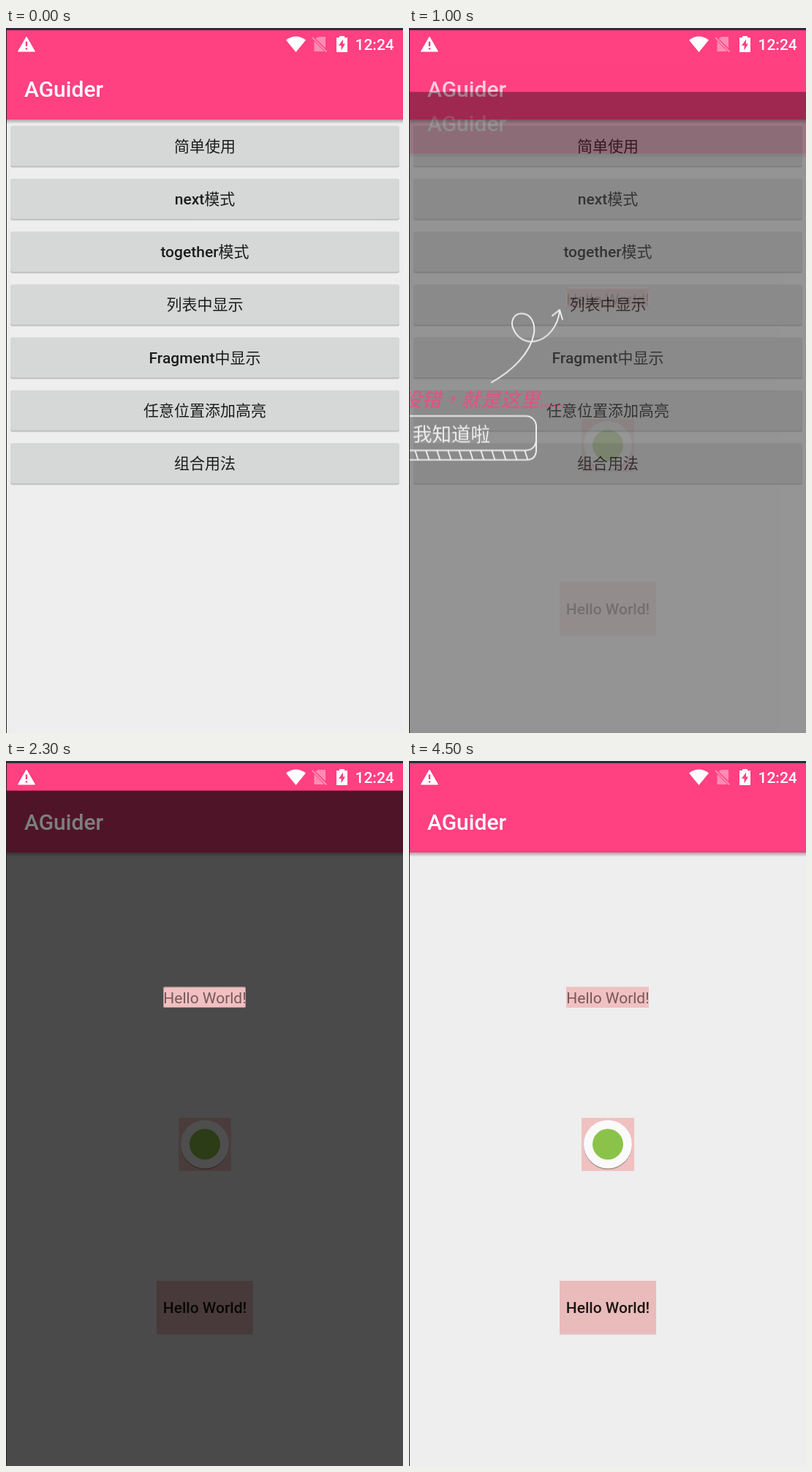
An HTML page that plays this animation: 543x963 px, repeating every 8000 ms.

```html
<!DOCTYPE html>
<html lang="zh">
<head>
<meta charset="utf-8">
<title>AGuider</title>
<style>
html, body { margin: 0; width: 100%; height: 100%; overflow: hidden; background: #eee; }
svg { display: block; width: 543px; height: 963px; }
text { font: 500 21px Roboto, "Noto Sans CJK SC", "Noto Sans CJK", sans-serif; }
.mid { text-anchor: middle; }
.title { font-size: 30px; fill: #fff; }
.plain { font-weight: 400; }
.say { font-size: 27px; font-weight: 400; font-style: italic; fill: #ff4081; }
.comma { font-family: "Noto Sans CJK TC", "Noto Sans CJK", sans-serif; }
.know { font-size: 26.5px; font-weight: 300; fill: #fff; }
.line { fill: none; stroke: #fff; stroke-width: 2; stroke-linecap: round; stroke-linejoin: round; }
.line * { vector-effect: non-scaling-stroke; }
.dim { fill: #000; fill-opacity: .69; fill-rule: evenodd; }
.edge { fill: none; stroke: #8a5c5e; stroke-opacity: .5; }

.ripple, .wave, .rise, .page, .shade, .cover, .tip1, .seam, .ghost,
.guide1, .guide2, .guide3, .tip2, .tip3 { animation: 8s step-end infinite; }

.ripple { animation-name: ripple; }
@keyframes ripple { 0%, 12.5%, to { opacity: 0 } 6.25% { opacity: 1 } }
.wave { animation-name: wave; }
@keyframes wave { 0%, to { r: 0 } 6.25% { r: 72px } 7.5% { r: 138px } }

.rise { animation-name: rise; }
@keyframes rise {
  0%, 15%, to { transform: none }
  12.5% { transform: translateY(46.5px) }
  13.75% { transform: translateY(9.5px) }
}
.page { animation-name: page; }
@keyframes page { 0% { opacity: 0 } 12.5% { opacity: .27 } 13.75% { opacity: .97 } 15%, to { opacity: 1 } }
.shade { animation-name: shade; }
@keyframes shade { 0%, 12.5% { opacity: .55 } 13.75%, to { opacity: 1 } }
.cover { animation-name: cover; }
@keyframes cover { 0%, 13.75%, to { opacity: 0 } 12.5% { opacity: 1 } }
.seam { animation-name: seam; }
@keyframes seam { 0%, 15%, to { opacity: 0 } 13.75% { opacity: .15 } }
.ghost { animation-name: ghost; }
@keyframes ghost { 0%, 56.25%, to { opacity: 0 } 13.75% { opacity: .27 } }

.guide1 { animation-name: guide1; }
@keyframes guide1 { 0%, 30%, to { opacity: 0 } 12.5% { opacity: 1 } }
.guide2 { animation-name: guide2; }
@keyframes guide2 { 0%, 41.25%, to { opacity: 0 } 30% { opacity: 1 } }
.guide3 { animation-name: guide3; }
@keyframes guide3 { 0%, 56.25%, to { opacity: 0 } 41.25% { opacity: 1 } }

.tip1 { animation-name: tip1; }
@keyframes tip1 { 0%, 28.75%, to { opacity: 0 } 12.5% { opacity: .85 } 13.75% { opacity: 1 } }
.tip2 { animation-name: tip2; }
@keyframes tip2 {
  0%, 38.75%, to { opacity: 0 }
  30% { opacity: .25 } 31.25% { opacity: .5 } 32.5% { opacity: .75 } 33.75% { opacity: 1 }
}
.tip3 { animation-name: tip3; }
@keyframes tip3 { 0%, to { opacity: 0 } 41.25% { opacity: .33 } 42.5% { opacity: .66 } 43.75% { opacity: 1 } }
</style>
</head>
<body>
<svg viewBox="0 0 543 963">
  <defs>
    <linearGradient id="fall" x2="0" y2="1">
      <stop stop-opacity=".3"/><stop offset="1" stop-opacity="0"/>
    </linearGradient>
    <clipPath id="firstRow"><rect x="6" y="133.5" width="532" height="55" rx="3"/></clipPath>
    <g id="bar">
      <rect y="125" width="543" height="6" fill="url(#fall)"/>
      <rect y="3" width="543" height="122" fill="#ff4081"/>
      <text class="title" x="25" y="94">AGuider</text>
    </g>
    <g id="know">
      <g class="line">
        <rect width="224" height="47" rx="14"/>
        <path d="M0 33V46Q0 60 14 60H210Q224 60 224 46V33"/>
      </g>
      <path d="M12 53.5H216" transform="translate(-15 0) skewX(18)" stroke="#fff" stroke-width="12" stroke-dasharray="2 13"/>
      <text class="know mid" x="108" y="34">我知道啦</text>
    </g>
    <path id="swirl" d="M113 447C140 432 166 408 171 380C173 362 164 353 154 353C143 353 139 364 142 372C147 387 160 393 172 391C190 388 204 370 206 349M196 356L206 348L210 361"/>
  </defs>

  <!-- menu page -->
  <rect width="543" height="963" fill="#eee"/>
  <use href="#bar"/>
  <g id="menu"></g>
  <g class="ripple" clip-path="url(#firstRow)">
    <rect x="6" y="133" width="532" height="56" fill-opacity=".02"/>
    <circle class="wave" cx="276" cy="161" fill-opacity=".06"/>
  </g>
  <g id="labels" class="mid" fill="#1c1c1c"></g>

  <!-- sample page -->
  <g class="page"><g class="rise">
    <rect y="3" width="543" height="960" fill="#eee"/>
    <use href="#bar"/>
    <rect x="215" y="308.5" width="113" height="28.5" fill="#f1c0c0"/>
    <text class="mid plain" x="272" y="331" fill="#75595b">Hello World!</text>
    <rect x="236" y="487.5" width="72" height="72.5" fill="#f1c0c0"/>
    <circle cx="272" cy="525" r="33" fill="#a98e8e"/>
    <circle cx="272" cy="523.5" r="33" fill="#fafafa"/>
    <circle cx="272" cy="523.5" r="21" fill="#8bc34a"/>
    <rect x="206" y="711" width="132" height="73" fill="#dcd4d4"/>
    <rect x="206" y="710" width="132" height="72.5" fill="#e9bbba"/>
    <text class="mid" x="272" y="754" fill="#1b1516">Hello World!</text>
  </g></g>

  <!-- guide steps -->
  <g class="guide1"><g class="rise">
    <g class="shade">
      <path class="dim" d="M0 40.5H543V963H0ZM217 308.5H326Q328 308.5 328 310.5V335Q328 337 326 337H217Q215 337 215 335V310.5Q215 308.5 217 308.5Z"/>
      <rect class="cover dim" x="215" y="308.5" width="113" height="28.5"/>
      <rect class="edge" x="215.5" y="309" width="112" height="27.5" rx="2"/>
    </g>
    <g class="tip1">
      <g class="line" transform="translate(0 -9.5)"><use href="#swirl"/></g>
      <text class="say" x="-10" y="471">没错<tspan class="comma" lang="zh-TW">，</tspan>就是这里……</text>
      <use href="#know" x="-50" y="483.5"/>
    </g>
  </g></g>
  <g class="guide2">
    <path class="dim" d="M0 40.5H543V963H0ZM236 523.5a36 36 0 0 0 72 0a36 36 0 0 0-72 0Z"/>
    <circle class="edge" cx="272" cy="523.5" r="35.5"/>
    <g class="tip2">
      <g class="line" transform="translate(515 345) scale(-.98 .62)"><use href="#swirl"/></g>
      <text class="say" x="314" y="652">还有这里……</text>
      <use href="#know" x="314" y="663"/>
    </g>
  </g>
  <g class="guide3">
    <path class="dim" d="M0 40.5H543V963H0ZM206 746a66 36 0 0 0 132 0a66 36 0 0 0-132 0Z"/>
    <ellipse class="edge" cx="272" cy="746" rx="65.5" ry="35.5"/>
    <g class="tip3">
      <use href="#know" x="160" y="501"/>
      <text class="say" x="147" y="596">大爷<tspan class="comma" lang="zh-TW">，</tspan>你终于来了……</text>
      <path class="line" d="M265 604C245 622 239 640 245 655C250 669 262 675 270 672C277 668 276 661 269 660C259 660 256 668 257 678C259 692 268 703 284 707M278 699L284 707L274 708"/>
    </g>
  </g>
  <g class="ghost"><text class="title rise" x="25" y="94">AGuider</text></g>
  <rect class="seam" y="3" width="543" height="9"/>

  <!-- status bar -->
  <g fill="#fff">
    <path d="M28 12L39.5 32H16.5Z" stroke="#fff" stroke-linejoin="round"/>
    <path d="M28 18.5V25M28 27.2V29.6" stroke="#ff4081" stroke-width="2.4"/>
    <path d="M396.5 33L383 16.5Q396.5 6.5 410 16.5Z"/>
    <g opacity=".4">
      <path d="M427 12H437V27.5L423.5 14.5ZM421.5 18L435.5 32H421.5Z"/>
      <path d="M419 13L438.5 32.5" stroke="#fff" stroke-width="1.8"/>
    </g>
    <path d="M456 11H463V13H467V33H452V13H456Z"/>
    <path d="M461 15.5L455 24H458.5V30.5L464 21.5H461Z" fill="#ff4081"/>
    <text x="477.5" y="30">12:24</text>
  </g>
  <rect width="543" height="3" fill="#2b2d38"/>
  <rect width="1" height="963" fill="#20222c"/>
</svg>
<script>
const rows = ['简单使用', 'next模式', 'together模式', '列表中显示', 'Fragment中显示', '任意位置添加高亮', '组合用法'];
const rowY = i => 133.5 + 72.25 * i;
const box = (y, height, fill) => `<rect x="6" y="${y}" width="532" height="${height}" rx="3" fill="${fill}"/>`;

document.getElementById('menu').innerHTML = rows.map((_, i) =>
  box(rowY(i) + 1, 56.5, '#d9d9d9') + box(rowY(i) + 1, 55.5, '#bcbdbd') + box(rowY(i), 55, '#d6d7d7')).join('');
document.getElementById('labels').innerHTML = rows.map((label, i) =>
  `<text x="272" y="${rowY(i) + 35}">${label}</text>`).join('');
</script>
</body>
</html>
```
